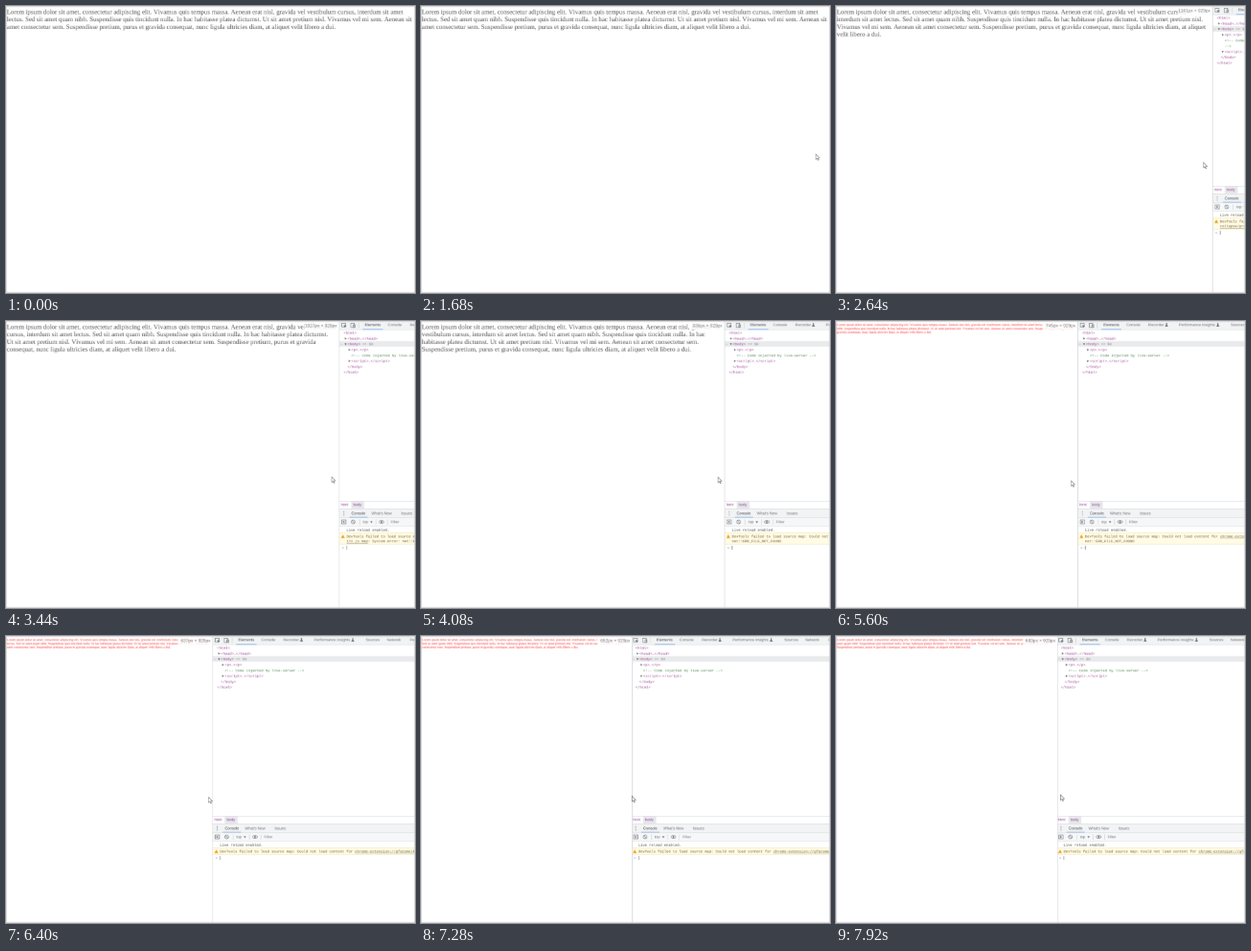
Animation of 427x300 px, one loop 8 s. Source, as an HTML page with a canvas:

```html
<!DOCTYPE html>
<html lang="en">
<head>
<meta charset="utf-8">
<title>Resizing a responsive page</title>
<style>
html, body { margin: 0; width: 100%; height: 100%; overflow: hidden; background: #fff; }
canvas { display: block; width: 427px; height: 300px; }
</style>
</head>
<body>
<canvas id="stage" width="427" height="300"></canvas>
<script>
const W = 427, H = 300, LOOP = 8000, STEP = 80, PX = 2.957, SCALE = 3;
// Drawn large, then reduced, so that tiny text stays smooth
const view = document.getElementById('stage').getContext('2d');
view.imageSmoothingQuality = 'high';
const large = document.createElement('canvas');
large.width = W * SCALE;
large.height = H * SCALE;
const ctx = large.getContext('2d');
ctx.scale(SCALE, SCALE);
ctx.textRendering = 'geometricPrecision';

const SERIF = '"Liberation Serif", serif';
const SANS = '"Liberation Sans", sans-serif';
const MONO = '"Liberation Mono", monospace';
const PURPLE = '#9a3f94', GREY = '#6c7075', CHAR = 2.235;
const WORDS = ('Lorem ipsum dolor sit amet, consectetur adipiscing elit. Vivamus quis tempus massa. ' +
  'Aenean erat nisl, gravida vel vestibulum cursus, interdum sit amet lectus. Sed sit amet quam nibh. ' +
  'Suspendisse quis tincidunt nulla. In hac habitasse platea dictumst. Ut sit amet pretium nisl. ' +
  'Vivamus vel mi sem. Aenean sit amet consectetur sem. Suspendisse pretium, purus et gravida consequat, ' +
  'nunc ligula ultricies diam, at aliquet velit libero a dui.').split(' ');

// Keyframes: [time, value...]
const EDGE = [[0, 429], [2000, 429], [2640, 392.7], [3440, 347.4], [4640, 289.5], [5600, 252],
  [6400, 215.4], [6720, 211], [7920, 231]];
const POINTER = [[320, 428, 260], [800, 393, 137], [1120, 393, 137], [2000, 423, 165], [2640, 383.5, 163.5],
  [3440, 340, 163], [4640, 284, 163.5], [5600, 245.5, 167], [6400, 211.5, 168.5], [6720, 208, 168.5],
  [7920, 234.5, 166]];

function at(keys, t) {
  const i = keys.findIndex(k => k[0] > t);
  if (i < 0) return keys[keys.length - 1].slice(1);
  if (!i) return keys[0].slice(1);
  const a = keys[i - 1], b = keys[i], f = (t - a[0]) / (b[0] - a[0]);
  return a.slice(1).map((v, j) => v + (b[j + 1] - v) * f);
}

function setFont(font) {
  ctx.font = '100px ' + font;
  ctx.fontKerning = 'none';
}

// Set at 100px and scaled down, so that small text keeps its exact spacing
function text(s, x, y, size, font, color, align = 'left') {
  ctx.save();
  ctx.translate(x, y);
  ctx.scale(size / 100, size / 100);
  setFont(font);
  ctx.textAlign = align;
  ctx.fillStyle = color;
  ctx.fillText(s, 0, 0);
  ctx.restore();
}

function box(x, y, w, h, color) {
  ctx.fillStyle = color;
  ctx.fillRect(x, y, w, h);
}

function frame(x, y, w, h, color = GREY, line = 0.5) {
  ctx.strokeStyle = color;
  ctx.lineWidth = line;
  ctx.strokeRect(x, y, w, h);
}

function shape(color, ...pts) {
  ctx.fillStyle = color;
  ctx.beginPath();
  for (const p of pts) ctx.lineTo(...p);
  ctx.closePath();
  ctx.fill();
}

function ring(x, y, rx, ry) {
  ctx.strokeStyle = GREY;
  ctx.lineWidth = 0.5;
  ctx.beginPath();
  ctx.ellipse(x, y, rx, ry, 0, 0, 7);
  ctx.stroke();
}

function arrow(x, y, down) {
  if (down) shape('#6e6e6e', [x - 1.2, y - 0.8], [x + 1.2, y - 0.8], [x, y + 1.1]);
  else shape('#6e6e6e', [x - 0.8, y - 1.2], [x + 1.1, y], [x - 0.8, y + 1.2]);
}

function page(edge) {
  const small = edge * PX < 768;
  const size = small ? 3.382 : 6.79, top = small ? 4.9 : 8.2, lead = small ? 3.95 : 7.87;
  const color = small ? '#f22' : '#555';
  const limit = (edge - 3.9) / size * 100;
  setFont(SERIF);
  const lines = [''];
  for (const w of WORDS) {
    const last = lines.length - 1, next = lines[last] ? lines[last] + ' ' + w : w;
    if (ctx.measureText(next).width > limit) lines.push(w);
    else lines[last] = next;
  }
  lines.forEach((s, i) => text(s, 1, top + i * lead, size, SERIF, color));
}

function sizeLabel(edge) {
  box(edge - 36, 1, 36, 8, 'rgba(255,255,255,.85)');
  text(`${Math.round(edge * PX)}px × 929px`, edge - 2, 6.2, 4.7, SANS, '#777', 'right');
}

const label = (s, x, y, color = GREY) => text(s, x, y + 1.4, 4, SANS, color);
const code = (s, x, y, color = PURPLE) => text(s, x, y + 1.2, 3.725, MONO, color);

function elementsTree(x, width) {
  box(x, 21, width, 5.8, '#e9eaec');
  code('…', x + 1.5, 23, GREY);
  code('== $0', x + 9 + 7 * CHAR, 24, '#888');
  const rows = [[5, '<html>'], [9, '<head>…</head>', 1], [9, '<body>', 2], [13, '<p>…</p>', 1],
    [13, width < 45 ? '<!-- Code' : '<!-- Code injected by live-server -->'],
    [13, '<script>…<\/script>', 1], [9, '</body>'], [5, '</html>']];
  if (width < 45) rows.splice(5, 0, [13, '-->']);
  rows.forEach(([dx, s, mark], i) => {
    const y = 12.5 + i * 5.87;
    code(s, x + dx, y, /^(<!|--)/.test(s) ? '#438545' : PURPLE);
    if (mark) arrow(x + dx - 2, y, mark > 1);
  });
}

function topBar(x, width) {
  box(x, 1, width, 8, '#f1f3f4');
  box(x, 9, width, 0.5, '#d8dadd');
  frame(x + 3, 2.3, 4, 3.8);
  shape(GREY, [x + 5, 4], [x + 8, 5.2], [x + 6, 7]);
  frame(x + 12.5, 2.3, 3.6, 4.4);
  frame(x + 15, 4, 2, 2.8);
  box(x + 20.5, 2, 0.5, 5.5, '#ccc');
  const tabs = [['Elements', 27], ['Console', 51], ['Recorder', 74], ['Performance insights', 106],
    ['Sources', 160], ['Network', 182], ['Performance', 206]];
  tabs.forEach(([s, dx], i) => label(s, x + dx, 4, i ? GREY : '#444'));
  for (const dx of [93, 146.5]) {
    shape(GREY, [x + dx - 1.6, 5.8], [x + dx - 0.5, 3.6], [x + dx - 0.5, 2],
      [x + dx + 0.5, 2], [x + dx + 0.5, 3.6], [x + dx + 1.6, 5.8]);
  }
  box(x + 25, 8.4, 21, 0.7, '#6fa3e8');
}

function drawer(x, width) {
  box(x, 188, width, 0.5, '#d8dadd');
  box(x + 13, 188.5, 13.5, 7.5, '#e6e8eb');
  label('html', x + 2.2, 192, PURPLE);
  label('body', x + 15, 192, PURPLE);

  box(x, 196, width, 9.5, '#f1f3f4');
  box(x, 196, width, 0.5, '#d8dadd');
  for (const y of [199, 200.8, 202.6]) box(x + 4.8, y, 0.8, 0.8, GREY);
  label('Console', x + 13, 201, '#444');
  label("What's New", x + 34, 201);
  label('Issues', x + 65, 201);
  box(x, 205.4, width, 0.5, '#d8dadd');
  box(x + 11, 204.7, 19, 0.7, '#6fa3e8');

  box(x, 206, width, 8.2, '#f6f7f8');
  box(x, 214, width, 0.5, '#dcdee1');
  frame(x + 3, 208, 4.4, 4);
  shape(GREY, [x + 4.3, 208.9], [x + 6.4, 210], [x + 4.3, 211.1]);
  ring(x + 15, 210, 2, 2);
  ctx.beginPath();
  ctx.moveTo(x + 13.6, 208.6);
  ctx.lineTo(x + 16.4, 211.4);
  ctx.stroke();
  for (const dx of [21.5, 38.5, 50.5]) box(x + dx, 207.5, 0.5, 5.5, '#ccc');
  label('top', x + 25, 210);
  arrow(x + 34, 210.2, true);
  ring(x + 44.5, 210, 2.5, 1.6);
  box(x + 43.7, 209.2, 1.6, 1.6, GREY);
  label('Filter', x + 54, 210, '#777');
}

function link(s, x, y) {
  code(s, x, y, '#6b5a35');
  box(x, y + 1.9, s.length * CHAR, 0.35, '#8a7a55');
}

function consoleLog(x, width) {
  const brown = '#735420', oneLine = width > 185, tall = oneLine ? 6.4 : 11.6;
  code('Live reload enabled.', x + 8, 218.5, '#444');
  box(x, 221.6, width, tall, '#fffbe5');
  box(x, 221.4, width, 0.5, '#f3e8b8');
  box(x, 221.6 + tall, width, 0.5, '#f3e8b8');
  shape('#eba51c', [x + 4.2, 223.2], [x + 6.2, 226.9], [x + 2.2, 226.9]);
  code('DevTools failed to load source map: Could not load content for ', x + 8, 225, brown);
  link('chrome-extension://gfatemejkd/util.js.map', x + 8 + 63 * CHAR, 225);
  if (!oneLine) {
    if (width < 45) link('collapse/prod', x + 8, 230.2);
    else if (width < 100) {
      link('ili.js.map', x + 8, 230.2);
      code(': System error: net::ERR_FILE', x + 8 + 10 * CHAR, 230.2, brown);
    } else code('net::ERR_FILE_NOT_FOUND', x + 8, 230.2, brown);
  }
  const y = oneLine ? 232 : 237;
  code('>', x + 3.2, y, '#4a86d8');
  box(x + 8, y - 2, 0.5, 4, '#555');
}

// The contents trail a little behind an edge that moves right
function devtools(edge, x) {
  const width = W - x;
  ctx.save();
  ctx.beginPath();
  ctx.rect(edge, 0, W, H);
  ctx.clip();
  box(x, 0, width, H, '#fff');
  topBar(x, width);
  elementsTree(x, width);
  drawer(x, width);
  consoleLog(x, width);
  box(edge, 0, 0.7, H, '#d6d8db');
  ctx.restore();
}

function pointer(x, y) {
  ctx.beginPath();
  for (const [dx, dy] of [[0, 0], [0, 5.6], [1.3, 4.5], [2.2, 6.5], [3, 6.1], [2.2, 4.2], [3.9, 4.1]]) {
    ctx.lineTo(x + dx, y + dy);
  }
  ctx.closePath();
  ctx.fillStyle = '#fff';
  ctx.fill();
  ctx.strokeStyle = '#666';
  ctx.lineWidth = 0.5;
  ctx.stroke();
}

function draw(now) {
  const t = Math.floor(now % LOOP / STEP) * STEP;
  const [edge] = at(EDGE, t), [before] = at(EDGE, t - STEP);
  box(0, 0, W, H, '#fff');
  page(edge);
  if (t > 2000) sizeLabel(edge);
  if (edge < W) devtools(edge, Math.min(edge, before));
  frame(0.5, 0.5, W - 1, H - 1, '#d4d4d4', 1);
  if (t >= 400) pointer(...at(POINTER, t));
  view.drawImage(large, 0, 0, W, H);
}

const start = performance.now();
function tick() {
  draw(performance.now() - start);
  requestAnimationFrame(tick);
}
tick();
</script>
</body>
</html>
```
